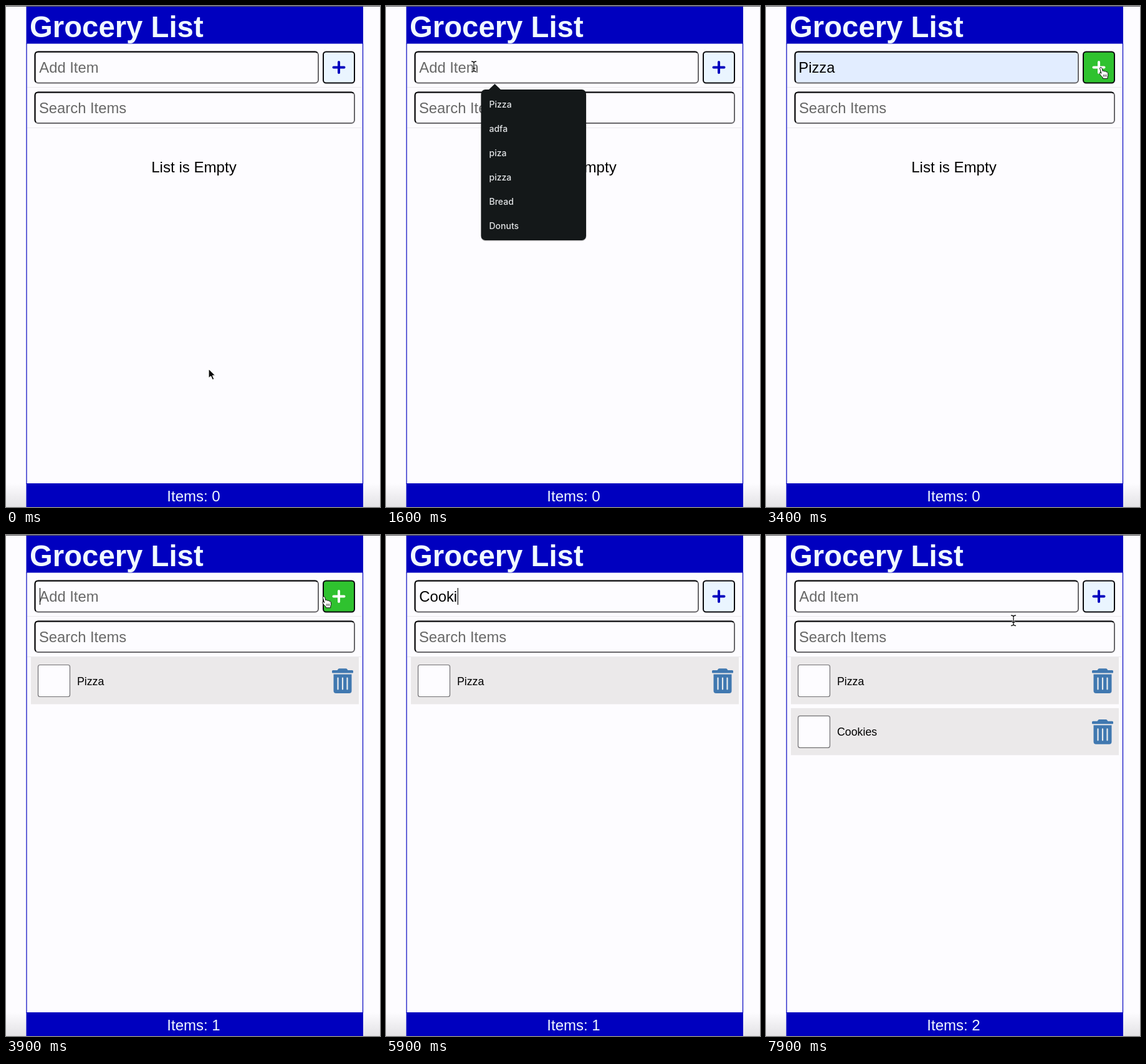
Write an HTML page that moves like this. It is 600 px wide and 804 px high and loops after 8 s.

```html
<!DOCTYPE html>
<html lang="en">
<head>
<meta charset="utf-8">
<title>Grocery List</title>
<style>
html, body { margin: 0; width: 100%; height: 100%; overflow: hidden; background: #fdfcff; }
svg { display: block; width: 600px; height: 804px; }
text { font-family: "Liberation Sans", Arial, sans-serif; font-size: 23.8px; white-space: pre; }
.menu text { font: 500 14px Inter, sans-serif; fill: #e2e4e6; }
.hint { fill: #676767; }
</style>
</head>
<body>
<svg id="stage" viewBox="0 0 600 804" xmlns="http://www.w3.org/2000/svg">
  <defs>
    <linearGradient id="shade" x2="0" y2="1">
      <stop offset="0" stop-color="#fdfcff"/>
      <stop offset="1" stop-color="#e3e2e5"/>
    </linearGradient>
    <g id="field-edge" fill="none" stroke-width="2"></g>
    <g id="row">
      <rect x="40" y="196" width="526" height="75.5" fill="#ebe9ea"/>
      <rect x="51.5" y="208.5" width="51" height="51" rx="3" fill="#fdfcff" stroke="#706f72" stroke-width="1.2"/>
      <g fill="#4078b0">
        <path d="M523 218.5Q523 217 524.5 217H531.5L533 215Q533.5 214.3 534.5 214.3H545.5Q546.5 214.3 547 215L548.500 217H555.500Q557 217 557 218.500V220.500Q557 221.500 556 221.500H524Q523 221.500 523 220.500Z"/>
        <path d="M525.500 223.500H554.500V250Q554.500 254 550.500 254H529.500Q525.500 254 525.500 250Z"/>
      </g>
      <path d="M532.500 229.500V247.500M540 229.500V247.500M547.500 229.500V247.500" stroke="#e8ebee" stroke-width="2.200" stroke-linecap="round"/>
    </g>
  </defs>

  <rect width="600" height="804" fill="#fdfcff"/>
  <rect y="766" width="600" height="38" fill="url(#shade)"/>
  <rect width="600" height="1" fill="#58575a"/>
  <path d="M33 60V767M572.500 60V767" stroke="#0000bf" stroke-width="1.200"/>
  <rect x="32.500" y="1" width="540.500" height="59.500" fill="#0000bf"/>
  <text x="38" y="49.500" fill="#f0f8ff" style="font-size:47.300px;font-weight:bold">Grocery List</text>
  <path d="M34 130.500H572M34 195.500H572" stroke="#ebeaed"/>

  <g id="add"></g>
  <text id="addText" x="53.500" y="107"></text>
  <path id="caret" d="M54.500 85V112" stroke="#222" stroke-width="1.300"/>
  <rect id="plusBox" x="509" y="73.500" width="50" height="50" rx="4.500" stroke="#0b0b0d" stroke-width="2"/>
  <path id="plus" d="M525.500 98.500H542.500M534 90V107" stroke-width="4" stroke-linecap="round"/>
  <g id="search"></g>
  <text class="hint" x="53" y="171.500">Search Items</text>

  <text id="empty" x="233.200" y="267" style="font-size:24.100px">List is Empty</text>
  <g id="item1"><use href="#row"/><text x="113.900" y="240.500" style="font-size:17.800px">Pizza</text></g>
  <g id="item2" transform="translate(0 81.800)"><use href="#row"/><text x="114" y="240.500" style="font-size:17.800px">Cookies</text></g>

  <rect x="32.500" y="766" width="540.500" height="38" fill="#0000bf"/>
  <text id="count" x="258.300" y="795" fill="#f0f8ff" style="font-size:24px"></text>

  <g id="menu" class="menu">
    <rect x="152" y="135.500" width="169.500" height="242" rx="8" fill="#000" opacity=".18"/>
    <path d="M164 135L174.500 125L185 135Z" fill="#141819"/>
    <rect x="152.500" y="134" width="168.500" height="242" rx="7" fill="#141819"/>
    <rect id="hover" x="156" y="138.800" width="161" height="38.800" rx="4" fill="#272b2d"/>
    <path id="close" d="M292.500 153.500L301.500 162.500M301.500 153.500L292.500 162.500" stroke="#d8dadc" stroke-width="1.300"/>
  </g>

  <g id="arrow">
    <path d="M0 0V15.500L3.600 12.300L6.200 18L9 16.800L6.500 11.200H11.300Z" fill="#0a0a0a" stroke="#fff" stroke-width="1.200" stroke-linejoin="round"/>
  </g>
  <g id="beam" fill="none" stroke-linecap="round">
    <path d="M-3.500-8Q-.500-8 0-6Q.500-8 3.500-8M0-6V6.500M-3.500 8.500Q-.500 8.500 0 6.500Q.500 8.500 3.500 8.500M-2 3H2" stroke="#fff" stroke-width="2.600"/>
    <path d="M-3.500-8Q-.500-8 0-6Q.500-8 3.500-8M0-6V6.500M-3.500 8.500Q-.500 8.500 0 6.500Q.500 8.500 3.500 8.500M-2 3H2" stroke="#151515" stroke-width="1.300"/>
  </g>
  <g id="hand" stroke="#111" stroke-width="1" stroke-linejoin="round">
    <path d="M-1.500 1Q-1.200-.600 .200-.600Q1.600-.400 2 1L3.100 5.400Q5 4.300 6 6Q8 5 8.800 6.900Q11 6.200 11.500 8.500Q12.500 12.500 11 15V17.500H3.500V16Q0 13-2 9.500Q-2.200 7.500-.500 8L1 9.300Z" fill="#fff"/>
    <path d="M4.600 11V14.500M6.800 11V14.500M9 11V14.500" fill="none" stroke-width=".8"/>
  </g>
</svg>
<script>
const LOOP = 8000, STEP = 100;
const el = id => document.getElementById(id);
const show = (id, on) => el(id).setAttribute('display', on ? 'inline' : 'none');
const set = (id, name, value) => el(id).setAttribute(name, value);

// Inset border: dark on top and left, grey on bottom and right
function field(id, x, y, w, h) {
  el(id).innerHTML =
    `<rect id="${id}Box" x="${x}" y="${y}" width="${w}" height="${h}" rx="5" fill="#fdfcff" stroke="#68676a" stroke-width="2"/>` +
    `<path d="M${x + 1.5} ${y + h - 1.5}Q${x} ${y + h - 3} ${x} ${y + h - 5}V${y + 5}Q${x} ${y} ${x + 5} ${y}H${x + w - 5}Q${x + w - 3} ${y} ${x + w - 1.5} ${y + 1.5}" fill="none" stroke="#0b0b0d" stroke-width="2"/>`;
}
field('add', 46.5, 73.5, 454.5, 50);
field('search', 46.5, 138.5, 512.5, 49.5);

['Pizza', 'adfa', 'piza', 'pizza', 'Bread', 'Donuts'].forEach((word, i) =>
  el('menu').insertAdjacentHTML('beforeend', `<text x="165.5" y="${163 + i * 38.9}">${word}</text>`));

// Pointer stops: time, x, y
const path = [
  [0, 325, 582], [100, 322, 560], [200, 319, 523], [300, 319, 523],
  [1100, 141, 97], [1700, 141, 97], [2300, 216, 163], [2700, 216, 163],
  [3200, 537, 99], [3700, 537, 99], [4500, 362, 101], [6300, 362, 101],
  [6800, 540, 95], [7500, 540, 95], [7900, 397, 137], [8000, 397, 137]
];

function pointer(t) {
  const i = path.findIndex((p, k) => k && t <= p[0]);
  const [t0, x0, y0] = path[i - 1], [t1, x1, y1] = path[i];
  const u = (t - t0) / (t1 - t0), e = u * u * (3 - 2 * u);
  return [x0 + (x1 - x0) * e, y0 + (y1 - y0) * e];
}

const inside = (x, y, l, t, r, b) => x >= l && x <= r && y >= t && y <= b;

function draw(t) {
  const [x, y] = pointer(t);
  const open = t >= 1400 && t < 2700;
  const items = (t >= 3600) + (t >= 7500);
  const typed = t >= 5200 && t < 7500 ? 'Cookies'.slice(0, 1 + Math.floor((t - 5200) / 150)) : '';
  const onMenu = open && inside(x, y, 152, 134, 321, 376);
  const onPizza = onMenu && y < 178;
  const filled = t >= 2700 && t < 3600;
  const onPlus = inside(x, y, 508, 72, 560, 125);
  const onField = !onMenu && (inside(x, y, 45, 72, 502, 125) || inside(x, y, 45, 137, 560, 189));
  const value = onPizza || filled ? 'Pizza' : typed;

  el('addText').textContent = value || 'Add Item';
  set('addText', 'fill', value ? '#000' : '#676767');
  set('addText', 'style', `font-size:${onPizza ? 14.4 : 23.8}px`);
  set('addText', 'x', onPizza ? 53 : value === 'Pizza' ? 52.3 : 53.3);
  set('addText', 'y', onPizza ? 106 : 107);
  set('addBox', 'fill', onPizza || filled ? '#e2edff' : '#fdfcff');

  const typing = t >= 5200 && t < 6300;
  const blink = (t >= 3600 && t < 5200 && (t - 3700) % 1000 >= 0 && (t - 3700) % 1000 < 500) || (t >= 4700 && t < 5200);
  show('caret', blink || typing);
  set('caret', 'transform', `translate(${typed ? el('addText').getComputedTextLength() : 0} 0)`);

  set('plusBox', 'fill', onPlus ? '#2fc22f' : '#eaf5ff');
  set('plus', 'stroke', onPlus ? '#fff' : '#0000bf');

  show('empty', !items);
  show('item1', items > 0);
  show('item2', items > 1);
  el('count').textContent = 'Items: ' + items;

  show('menu', open);
  show('hover', onPizza);
  show('close', onPizza);

  const kind = onPlus ? 'hand' : onField ? 'beam' : 'arrow';
  for (const id of ['hand', 'beam', 'arrow']) {
    show(id, id === kind && !typing);
    set(id, 'transform', `translate(${x.toFixed(1)} ${y.toFixed(1)})`);
  }
}

function frame() {
  draw(Math.floor(performance.now() % LOOP / STEP) * STEP);
  requestAnimationFrame(frame);
}
frame();
</script>
</body>
</html>
```
